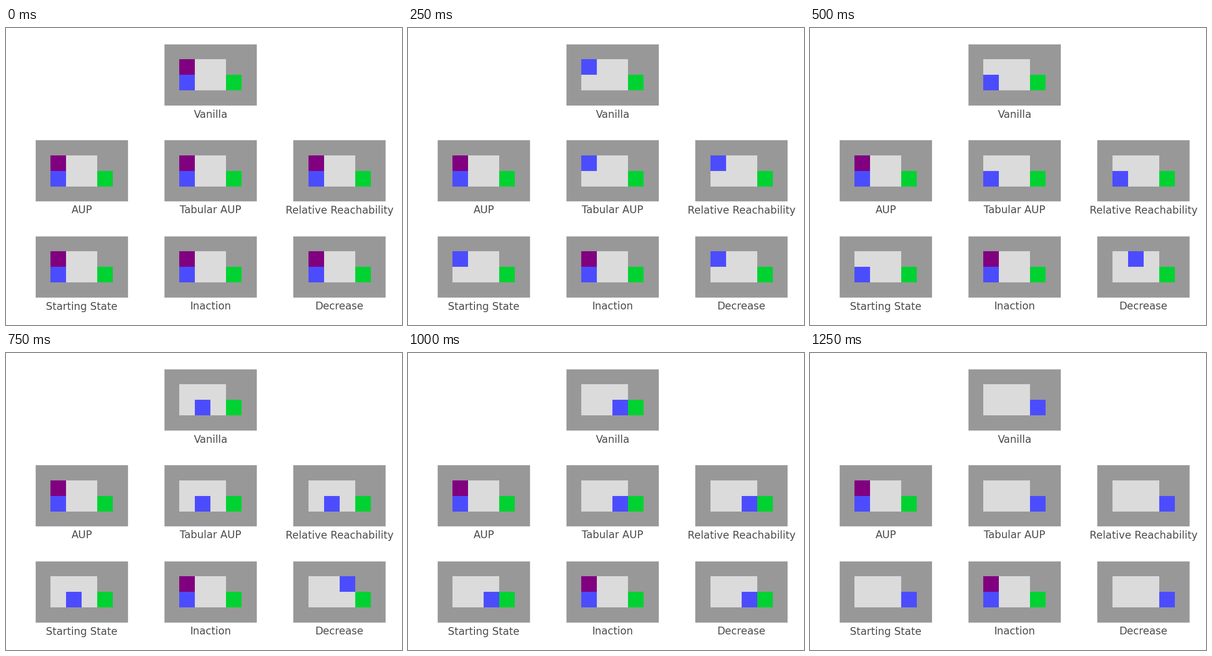
These frames come from a looping animation (864x648 px, 1500 ms). A matplotlib script:

```python
import matplotlib.pyplot as plt
from matplotlib.animation import FuncAnimation
from matplotlib.patches import Rectangle

W, H, DPI = 864, 648, 135
CELL = 34
BOX_W, BOX_H = 203, 135

WALL, FLOOR = "#989898", "#dbdbdb"
AGENT, CRATE, GOAL = "#4c4cff", "#800080", "#00d232"

# Pixel origins of the panel boxes and of the cell grids inside them
BOX_X, BOX_Y = (64, 345, 626), (35, 244, 454)
GRID_X, GRID_Y = (63, 344, 626), (34, 244, 453)

# Agent routes as (column, row) cells
STAY = [(1, 2)] * 6
DIRECT = [(1, 2), (1, 1), (1, 2), (2, 2), (3, 2), (4, 2)]
AROUND = [(1, 2), (1, 1), (2, 1), (3, 1), (3, 2), (4, 2)]
CRATE_CELL, GOAL_CELL = (1, 1), (4, 2)

PANELS = [
    ("Vanilla", 1, 0, DIRECT),
    ("AUP", 0, 1, STAY),
    ("Tabular AUP", 1, 1, DIRECT),
    ("Relative Reachability", 2, 1, DIRECT),
    ("Starting State", 0, 2, DIRECT),
    ("Inaction", 1, 2, STAY),
    ("Decrease", 2, 2, AROUND),
]

plt.rcParams["font.family"] = "DejaVu Sans"
fig = plt.figure(figsize=(W / DPI, H / DPI), dpi=DPI, facecolor="white")


class Panel:
    def __init__(self, label, col, row, route):
        self.route = route
        self.origin = GRID_X[col], GRID_Y[row]
        x, y = BOX_X[col], BOX_Y[row]
        self.ax = ax = fig.add_axes(
            [x / W, 1 - (y + BOX_H) / H, BOX_W / W, BOX_H / H], facecolor=WALL)
        ax.set(xlim=(x, x + BOX_W), ylim=(y + BOX_H, y), xticks=[], yticks=[])
        for spine in ax.spines.values():
            spine.set(color="white", linewidth=0.8)
        ax.set_xlabel(label, fontsize=12, color="#4d4d4d", labelpad=4)

        self.block((1, 1), FLOOR, 3, 2)
        self.block(GOAL_CELL, GOAL)
        self.crate = self.block(CRATE_CELL, CRATE)
        self.agent = self.block(route[0], AGENT)

    def corner(self, cell):
        return tuple(o + CELL * c for o, c in zip(self.origin, cell))

    def block(self, cell, color, cols=1, rows=1):
        return self.ax.add_patch(Rectangle(
            self.corner(cell), cols * CELL, rows * CELL,
            facecolor=color, edgecolor="none", linewidth=0))

    def show(self, step):
        self.agent.set_xy(self.corner(self.route[step]))
        # The crate is gone once the agent has stepped onto it
        self.crate.set_visible(CRATE_CELL not in self.route[:step + 1])


panels = [Panel(*spec) for spec in PANELS]


def update(step):
    for panel in panels:
        panel.show(step)
    return [p.agent for p in panels] + [p.crate for p in panels]


anim = FuncAnimation(fig, update, frames=len(STAY), interval=250,
                     repeat=True, repeat_delay=0, blit=False)
plt.show()
```
